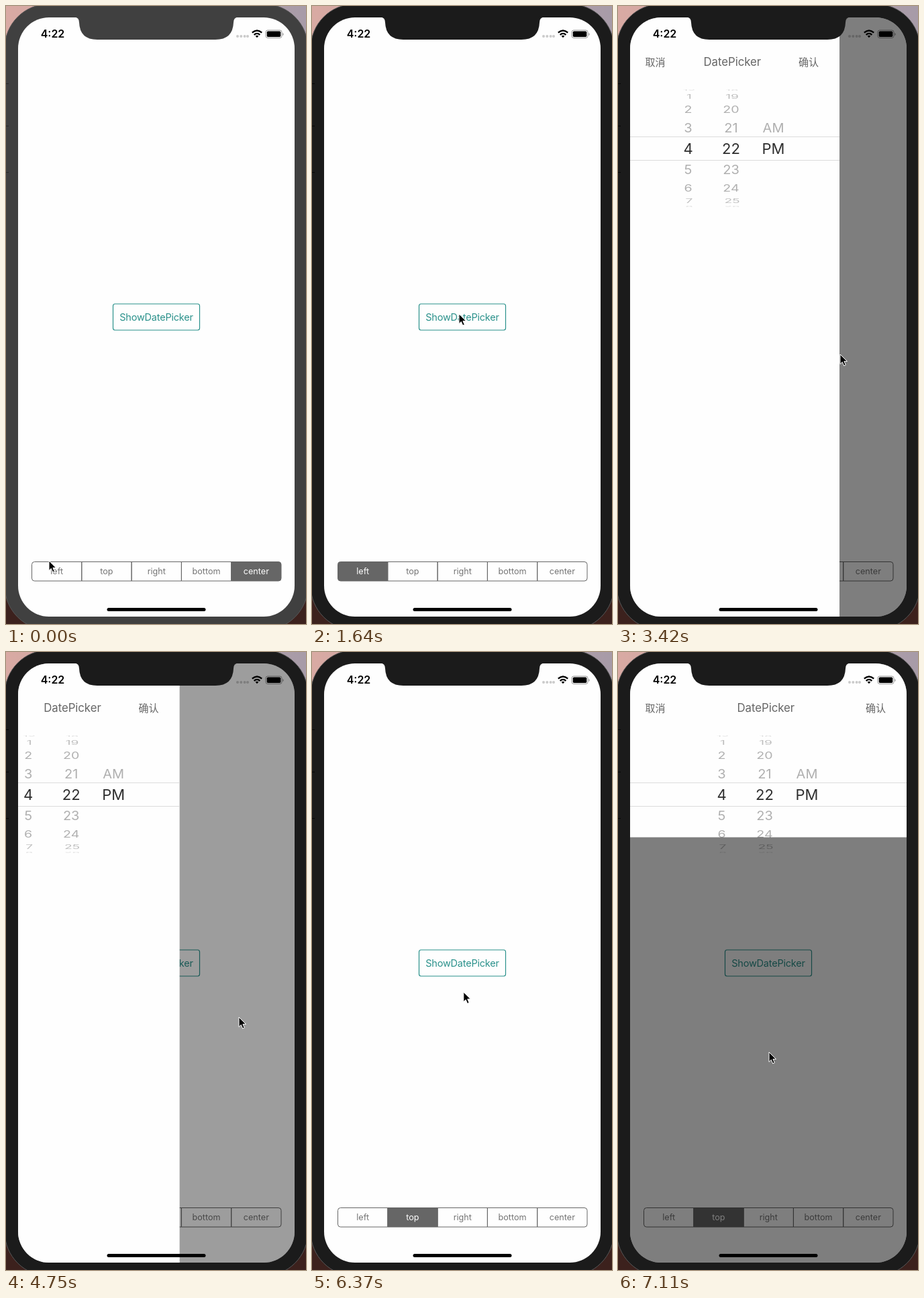
These frames come from a looping animation (447x919 px, 8 s). An HTML page:

```html
<!DOCTYPE html>
<html lang="en">
<head>
<meta charset="utf-8">
<title>Date picker drawer</title>
<style>
  html, body { margin: 0; width: 100%; height: 100%; overflow: hidden; background: #1b1b1b; }
  svg { display: block; width: 447px; height: 919px; }
  text { font-family: Inter, "Noto Sans CJK SC", "Noto Sans CJK", sans-serif; text-anchor: middle; }
  .clock { font-size: 16px; font-weight: 600; }
  .action { font-size: 14.5px; letter-spacing: -.2px; fill: #2a918b; }
  .segment { font-size: 12.6px; fill: #747474; }
  .title { font-size: 16.8px; letter-spacing: -.05px; fill: #666; }
  .choice { font-size: 15px; fill: #666; }
</style>
</head>
<body>
<svg id="stage" viewBox="0 0 447 919">
  <defs>
    <clipPath id="display"><rect x="18" y="17" width="412" height="891" rx="46"/></clipPath>
    <linearGradient id="sky"><stop stop-color="#d9aaa3"/><stop offset="1" stop-color="#a79ba8"/></linearGradient>
  </defs>

  <rect width="447" height="460" fill="url(#sky)"/>
  <rect y="460" width="447" height="459" fill="#3c211d"/>
  <rect id="bezel" x="-2" y="-3" width="452" height="931" rx="66" stroke="#565656"/>
  <path id="seams" d="M0 115.500h4M0 178.500h4M0 247.500h4" stroke="#000"/>

  <g clip-path="url(#display)">
    <rect x="18" y="17" width="412" height="891" fill="#fefefe"/>
    <rect x="159.500" y="443" width="129" height="39" rx="3" fill="none" stroke="#2a918b" stroke-width="1.200"/>
    <text id="action" class="action" x="224" y="468">ShowDatePicker</text>
    <g id="segments"></g>
    <rect id="dim" x="18" y="17" width="412" height="891"/>
    <g id="panels"></g>

    <text class="clock" x="69.500" y="47.300">4:22</text>
    <g fill-opacity=".2">
      <circle cx="345" cy="45" r="2"/><circle cx="350.300" cy="45" r="2"/>
      <circle cx="355.600" cy="45" r="2"/><circle cx="360" cy="45" r="2"/>
    </g>
    <g fill="none" stroke="#000" stroke-width="2.300">
      <path d="M366.800 39.700Q374 33.200 381.200 39.700M369.600 42.800Q374 39 378.400 42.800"/>
      <path d="M371.600 44.600Q374 42.700 376.400 44.600L374 47.200z" fill="#000" stroke="none"/>
    </g>
    <rect x="387" y="36" width="24" height="11.500" rx="3" fill="none" stroke="#000" stroke-opacity=".4"/>
    <rect x="388.700" y="37.600" width="20.600" height="8.300" rx="1.700"/>
    <path d="M412.300 40v4q1.400-.6 1.400-2t-1.400-2z" fill-opacity=".4"/>
    <rect x="150.500" y="895" width="147" height="5" rx="2.500"/>
  </g>
  <path id="notch" d="M102 16.500Q109 17 109 24.500Q110 50 136 50H312Q338 50 339 24.500Q339 17 346 16.500z"/>

  <path id="cursor" d="M0 0V14.500L3.300 11.400 5.700 17 8.300 15.900 5.900 10.400H10.500z" fill="#000" stroke="#fff" stroke-width="1"/>
</svg>

<script>
const LOOP = 8000, STEPS = 54;
const LEFT = 0, TOP = 1, CENTER = 4;
const $ = id => document.getElementById(id);

function add(parent, tag, attrs, content) {
  const node = document.createElementNS("http://www.w3.org/2000/svg", tag);
  for (const key in attrs) node.setAttribute(key, attrs[key]);
  if (content !== undefined) node.textContent = content;
  return parent.appendChild(node);
}

// Segmented control
const SEG_X = 38.5, SEG_Y = 826.5, SEG_W = 74.3, SEG_H = 28.5;
const segments = ["left", "top", "right", "bottom", "center"].map((label, i) => {
  const x = SEG_X + i * SEG_W, r = SEG_X + (i + 1) * SEG_W, b = SEG_Y + SEG_H;
  const d = i === 0 ? `M${r} ${SEG_Y}H${x + 4}q-4 0-4 4V${b - 4}q0 4 4 4H${r}z`
    : i === 4 ? `M${x} ${SEG_Y}H${r - 4}q4 0 4 4V${b - 4}q0 4-4 4H${x}z`
    : `M${x} ${SEG_Y}H${r}V${b}H${x}z`;
  const fill = add($("segments"), "path", { d, fill: "#666", stroke: "#666" });
  const text = add($("segments"), "text", { class: "segment", x: x + SEG_W / 2, y: 845.4 }, label);
  return { fill, text };
});

// A wheel is a cylinder seen from the front, one row every 21 degrees
function addWheel(panel, x, labels, selected) {
  labels.forEach((label, i) => {
    const row = i - selected, angle = row * 21 * Math.PI / 180, far = Math.abs(row);
    const y = 212 + 87 * Math.sin(angle);
    const shift = far > 2 ? 1.5 : 0;
    add(panel, "text", {
      transform: `translate(${x + shift} ${y}) scale(1 ${Math.cos(angle)})`,
      y: far ? 7.2 : 8,
      "font-size": far ? 20.4 - far * 0.4 : 22,
      "fill-opacity": far ? [0, 0.31, 0.31, 0.25, 0.13][far] : 0.82
    }, label);
  });
}

function addPanel(width, height) {
  const panel = add($("panels"), "g", {});
  const center = 18 + width / 2, right = 18 + width;
  add(panel, "rect", { x: 18, y: 17, width, height, fill: "#fefefe" });
  add(panel, "text", { class: "choice", x: 55.5, y: 88.5 }, "取消");
  add(panel, "text", { class: "title", x: center - 3.7, y: 89 }, "DatePicker");
  add(panel, "text", { class: "choice", x: right - 46, y: 88.5 }, "确认");
  add(panel, "path", { d: `M18 194.500H${right}M18 229.500H${right}`, stroke: "#dcdcdc" });
  addWheel(panel, center - 69.5, [12, 1, 2, 3, 4, 5, 6, 7, 8], 4);
  addWheel(panel, center - 5.5, [18, 19, 20, 21, 22, 23, 24, 25, 26], 4);
  addWheel(panel, center + 57.5, ["AM", "PM"], 1);
  return panel;
}
const leftPanel = addPanel(312, 891), topPanel = addPanel(412, 258.5);

// Pointer path: [step, x, y]
const path = [
  [0, 64, 825], [3, 64, 825], [8, 218, 466], [9, 219, 452], [10, 219, 452], [11, 219, 458],
  [17, 219, 458], [22, 328, 519], [23, 331, 518], [24, 331, 518], [29, 347, 543],
  [33, 347, 543], [37, 164, 839], [39, 164, 839], [44, 233, 467], [45, 233, 467],
  [47, 225, 595], [48, 224, 596], [STEPS, 224, 596]
];

const ease = x => { x = Math.min(1, Math.max(0, x)); return x * x * (3 - 2 * x); };
const slide = (step, start) => ease((step - start) / 2);

function pointerAt(step) {
  const i = path.findIndex(p => p[0] > step);
  const [s0, x0, y0] = path[i - 1], [s1, x1, y1] = path[i];
  const k = ease((step - s0) / (s1 - s0));
  return [x0 + (x1 - x0) * k, y0 + (y1 - y0) * k];
}

function place(panel, shown, x, y) {
  panel.setAttribute("visibility", shown > 0 ? "visible" : "hidden");
  panel.setAttribute("transform", `translate(${x * (shown - 1)} ${y * (shown - 1)})`);
}

function draw(step) {
  const body = step < 1 ? "#404040" : "#1b1b1b";
  $("bezel").setAttribute("fill", body);
  $("notch").setAttribute("fill", body);
  $("seams").setAttribute("opacity", step < 1 ? 0.35 : 0.8);

  const selected = step < 3 ? CENTER : step < 38 ? LEFT : TOP;
  const pressed = step === 2 ? LEFT : step === 37 ? TOP : -1;
  segments.forEach(({ fill, text }, i) => {
    fill.setAttribute("fill-opacity", i === selected ? 1 : i === pressed ? 0.15 : 0);
    text.style.fill = i === selected ? "#fff" : "";
  });

  const left = slide(step, 15.49) - slide(step, 31.38);
  const top = slide(step, 44.49);
  place(leftPanel, left, 312, 0);
  place(topPanel, top, 0, 258);
  $("dim").setAttribute("opacity", 0.5 * (left + top));

  const sincePress = step >= 44 ? step - 44 : step - 15;
  $("action").setAttribute("opacity", sincePress === 0 ? 0.35 : sincePress === 1 ? 0.65 : 1);
  $("cursor").setAttribute("transform", `translate(${pointerAt(step)})`);
}

function tick() {
  draw(Math.floor((performance.now() % LOOP) / LOOP * STEPS));
  requestAnimationFrame(tick);
}
tick();
</script>
</body>
</html>
```
